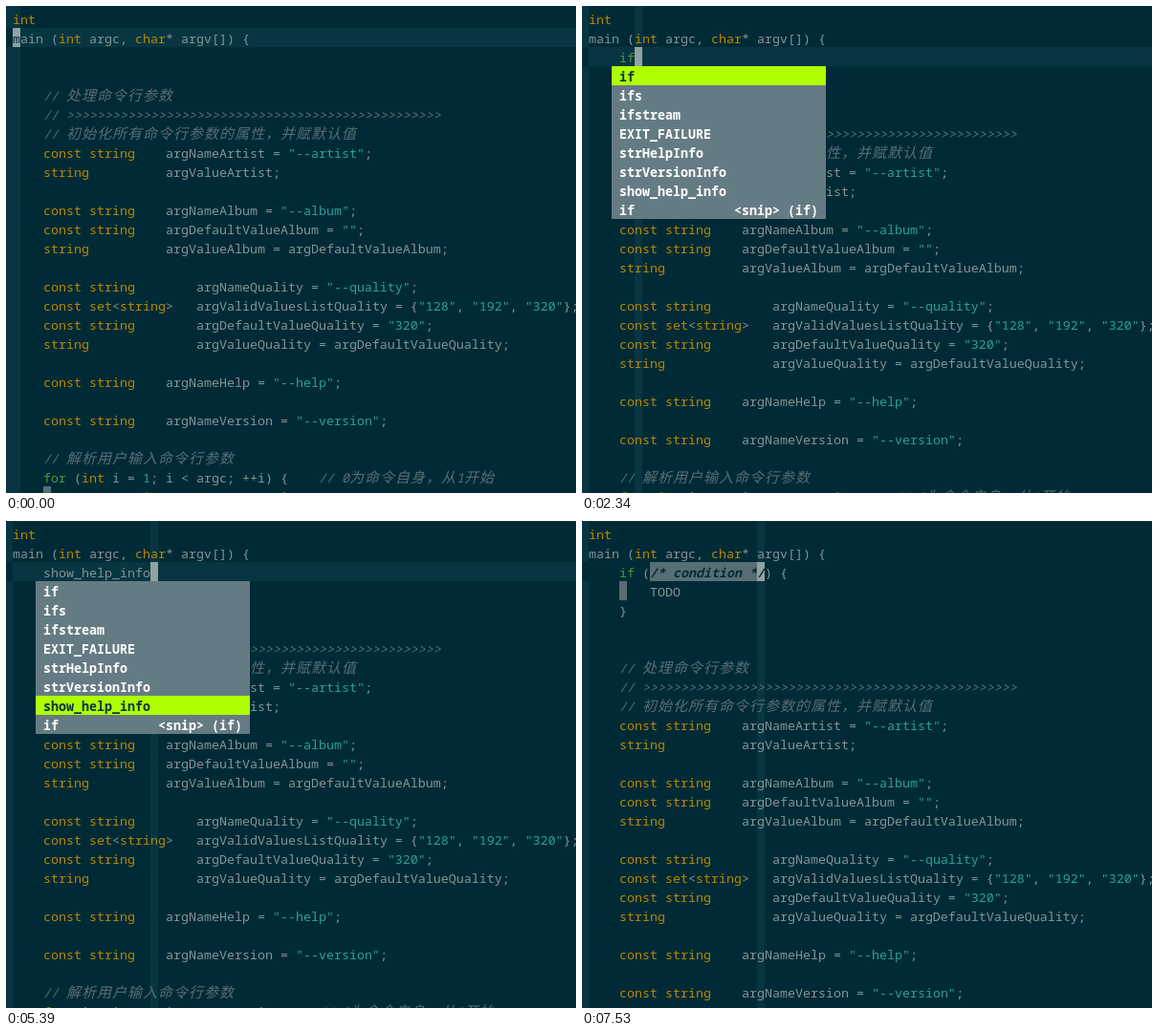
Recreate the animation shown at these times as an HTML page. Size 596 by 510 pixels, loop 8 s.

```html
<!DOCTYPE html>
<html lang="zh-CN">
<head>
<meta charset="utf-8">
<title>Editor completion</title>
<style>
  html, body { margin: 0; width: 100%; height: 100%; overflow: hidden; background: #002b36; }
  #stage {
    position: relative; width: 596px; height: 510px; overflow: hidden;
    background: #002b36; color: #839496;
    font: 13.3333px/20px "Noto Sans Mono", "DejaVu Sans Mono", monospace;
  }
  #stage div { position: absolute; white-space: pre; }
  /* text sits one pixel below the top of its cell */
  .text { height: 20px; padding-top: 1px; box-sizing: border-box; }
  .type { color: #b58900; }
  .key { color: #4e9a3a; }
  .lit { color: #2aa198; }
  .note { color: #586e75; font-style: italic; }
  .cjk { font: 15px/0 "Noto Sans CJK SC", "Noto Sans CJK", sans-serif; font-style: italic; letter-spacing: 1px; }
  .band { background: #073642; }
  .guide { background: #586e75; }
  .cursor { background: #93a1a1; color: #002b36; }
  .visual { background: #586e75; color: #002b36; font-weight: bold; font-style: italic; }
  .strong { font-weight: bold; font-style: italic; }
  .item { background: #657b83; color: #fff; font-weight: bold; }
  .item.on { background: #afff00; color: #073642; }
</style>
</head>
<body>
<div id="stage"></div>
<script>
const LOOP = 8000, CELL = 8, ROW = 20, LEFT = 7, TOP = 3;
const stage = document.getElementById("stage");

const head = ["int", "main (int argc, char* argv[]) {"];
const body = [
  "", "",
  "    // 处理命令行参数",
  "    // " + ">".repeat(49),
  "    // 初始化所有命令行参数的属性，并赋默认值",
  '    const string    argNameArtist = "--artist";',
  "    string          argValueArtist;",
  "",
  '    const string    argNameAlbum = "--album";',
  '    const string    argDefaultValueAlbum = "";',
  "    string          argValueAlbum = argDefaultValueAlbum;",
  "",
  '    const string        argNameQuality = "--quality";',
  '    const set<string>   argValidValuesListQuality = {"128", "192", "320"};',
  '    const string        argDefaultValueQuality = "320";',
  "    string              argValueQuality = argDefaultValueQuality;",
  "",
  '    const string    argNameHelp = "--help";',
  "",
  '    const string    argNameVersion = "--version";',
  "",
  "    // 解析用户输入命令行参数",
  "    for (int i = 1; i < argc; ++i) {    // 0为命令自身，从1开始",
  "        const string newArg = argv[i];"
];
const items = ["if", "ifs", "ifstream", "EXIT_FAILURE", "strHelpInfo",
  "strVersionInfo", "show_help_info", "if             <snip> (if)"];
const snippet = ["    if (/* condition */) {", "        TODO", "    }"];
const typed = word => ["    " + word];

// time, inserted lines, cursor row, cursor column (-1 hidden), cursor glyph,
// highlighted column, selected item (-1 none, undefined: menu closed)
const steps = [
  [0, [], 1, 0, "m", 0],
  [600, [""], 2, -1, "", 0],
  [640, [""], 2, 4, "", 4],
  [1170, typed("i"), 2, -1, "", 4],
  [1210, typed("i"), 2, 5, "", 5],
  [1290, typed("if"), 2, -1, "", 5],
  [1320, typed("if"), 2, 6, "", 6],
  [1350, typed("if"), 2, -1, "", 6, -1],
  [1390, typed("if"), 2, 6, "", 6, -1],
  [2340, typed("if"), 2, 6, "", 6, 0],
  [2640, typed("ifs"), 2, 7, "", 6, 1],
  [3020, typed("ifstream"), 2, -1, "", 6, 1],
  [3060, typed("ifstream"), 2, 12, "", 7, 2],
  [3440, typed("EXIT_FAILURE"), 2, 16, "", 12, 3],
  [4240, typed("strHelpInfo"), 2, -1, "", 12, 3],
  [4290, typed("strHelpInfo"), 2, 15, "", 16, 4],
  [4720, typed("strVersionInfo"), 2, 18, "", 15, 5],
  [5350, typed("show_help_info"), 2, -1, "", 15, 5],
  [5390, typed("show_help_info"), 2, 18, "", 18, 6],
  [6690, typed("if"), 2, -1, "", 18, 6],
  [6730, typed("if"), 2, 6, "", 18, 7],
  [7210, typed("if"), 2, 6, ";", 18, 7],
  [7390, typed("if"), 2, 6, "", 18, 7],
  [7450, typed("if"), 2, -1, "", 18, 7],
  [7490, snippet, 2, -1, "", 18],
  [7530, snippet, 2, 22, "/", 22]
];

const escape = s => s.replace(/&/g, "&amp;").replace(/</g, "&lt;").replace(/>/g, "&gt;");
const span = (cls, html) => `<span class="${cls}">${html}</span>`;
const x = col => LEFT + col * CELL;
const y = row => TOP + row * ROW;

function box(cls, left, top, width, height, html = "") {
  return `<div class="${cls}" style="left:${left}px;top:${top}px;width:${width}px;height:${height}px">${html}</div>`;
}

function cells(cls, col, row, count, html) {
  return box("text " + cls, x(col), y(row), count * CELL, ROW, html);
}

function paint(line) {
  const token = /(\/\/.*|\/\*.*?\*\/)|("[^"]*"|\b\d+\b|\bEXIT_FAILURE\b)|\b(const|string|set|int|char|ifstream)\b|\b(if|for)\b|[^"\/\w]+|\w+|./g;
  return line.replace(token, (all, note, lit, type, key) => {
    const text = escape(all);
    if (note) return span("note", text.replace(/[\u3000-\u9fff\uff00-\uffef]+/g, s => span("cjk", s)));
    if (lit) return span("lit", text);
    if (type) return span("type", text);
    return key ? span("key", text) : text;
  });
}

function draw([, added, row, col, glyph, stripe, chosen]) {
  const selecting = added === snippet && col >= 0;
  // number column, broken at the current line
  let html = box("band", 0, 0, LEFT, y(row)) + box("band", 0, y(row + 1), LEFT, 510);
  html += box("band", x(stripe), 0, CELL, 510);
  if (!selecting) html += box("band", LEFT, y(row), 589, ROW);

  [...head, ...added, ...body].forEach((line, i) => {
    if (line.startsWith("        ")) html += cells("guide", 4, i, 1);
    if (line) html += cells("", 0, i, 90, paint(line));
  });

  if (selecting) html += cells("visual", 8, row, 15, "/* condition */");
  if (col >= 0) html += cells("cursor" + (selecting ? " strong" : ""), col, row, 1, glyph);

  if (chosen !== undefined) {
    items.forEach((item, i) => {
      html += cells(i === chosen ? "item on" : "item", 3, row + 1 + i, 28, " " + escape(item));
    });
  }
  stage.innerHTML = html;
}

let shown = null;
function tick() {
  const t = performance.now() % LOOP;
  const step = steps.findLast(s => s[0] <= t);
  if (step !== shown) draw(shown = step);
  requestAnimationFrame(tick);
}
tick();
</script>
</body>
</html>
```
